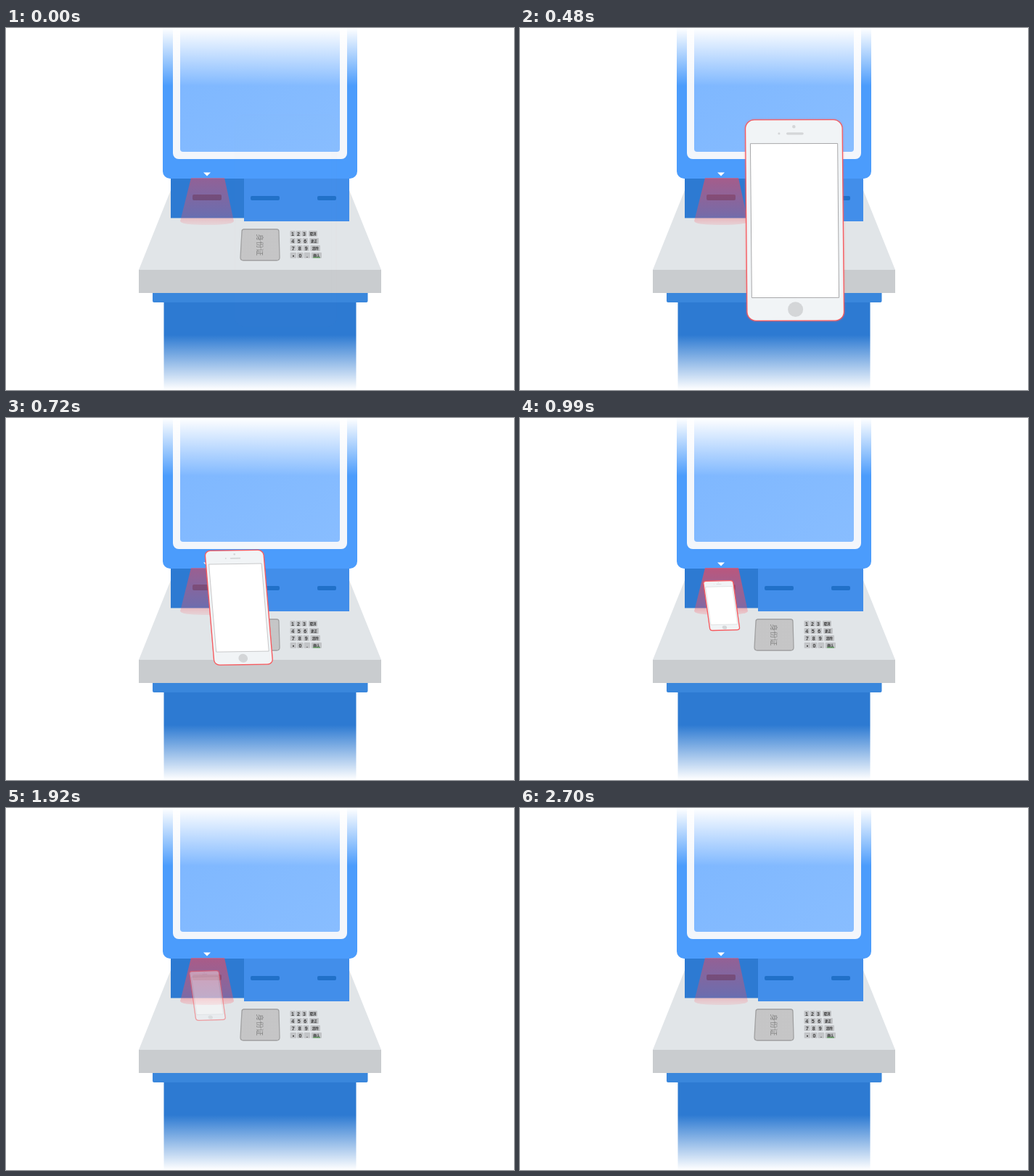
These frames come from a looping animation (700x500 px, 2730 ms). An HTML page:

```html
<!DOCTYPE html>
<html lang="zh">
<head>
<meta charset="utf-8">
<style>
  html, body { margin: 0; width: 100%; height: 100%; overflow: hidden; background: #fff; }
  svg { display: block; width: 700px; height: 500px; }
  text { text-anchor: middle; font-family: "Noto Sans CJK SC", "Noto Sans CJK", "Noto Sans", sans-serif; }
  .digit { font: bold 7px "Liberation Sans", sans-serif; fill: #3a3a3a; }
  .label { font-size: 4.5px; font-weight: bold; fill: #333; }
</style>
</head>
<body>
<svg viewBox="0 0 700 500">
  <defs>
    <linearGradient id="topFade" x2="0" y2="1">
      <stop stop-color="#fff"/><stop offset="1" stop-color="#fff" stop-opacity="0"/>
    </linearGradient>
    <linearGradient id="bottomFade" x2="0" y2="1">
      <stop stop-color="#fff" stop-opacity="0"/><stop offset="1" stop-color="#fff"/>
    </linearGradient>
    <linearGradient id="display" x2="1" y2="1">
      <stop stop-color="#7cb6ff"/><stop offset="1" stop-color="#88bdff"/>
    </linearGradient>
    <linearGradient id="ray" x2="0" y2="1">
      <stop stop-color="#ff4654"/><stop offset=".8" stop-color="#ff4e5a" stop-opacity=".62"/>
      <stop offset="1" stop-color="#ff5a66" stop-opacity=".25"/>
    </linearGradient>
    <pattern id="hatch" width="2" height="2" patternUnits="userSpaceOnUse">
      <rect width="2" height="2" fill="#c9c9ca"/><rect width="1" height="1" fill="#bababb"/>
    </pattern>
    <filter id="soft" x="-20%" y="-20%" width="140%" height="140%"><feGaussianBlur stdDeviation="1.2"/></filter>
    <path id="beam" d="M255 207H301L314 267Q312 272 277 272T240 267Z" fill="url(#ray)"/>
  </defs>

  <path d="M227 224H473L517 334H183Z" fill="#e1e5e8"/>
  <path d="M183 334H517V366H183Z" fill="#c9cccf"/>
  <path d="M217.5 379H482.5V500H217.5Z" fill="#2d7ad2"/>
  <path d="M202 366H498.5V377Q498.5 379 496.5 379H204Q202 379 202 377Z" fill="#3a87dc"/>
  <rect x="210" y="424" width="280" height="76" fill="url(#bottomFade)"/>

  <path d="M227 206H328V262.5H227Z" fill="#2d7ad2"/>
  <path d="M328 206H473V267H328Z" fill="#428eea"/>
  <g fill="#2070c8">
    <rect x="257" y="230" width="40" height="8" rx="2" fill="#1c4f92"/>
    <rect x="337" y="232" width="40" height="6" rx="2"/>
    <rect x="429" y="232" width="26" height="6" rx="2"/>
  </g>

  <rect x="216" y="-20" width="268" height="228" rx="10" fill="#4b9cfc"/>
  <rect x="230" y="-20" width="240" height="201" rx="8" fill="#f3f6fb"/>
  <rect x="240" y="-20" width="220" height="191" rx="4" fill="url(#display)"/>
  <rect x="210" width="280" height="80" fill="url(#topFade)"/>
  <path d="M272 199.5H282L277 204.5Z" fill="#fff"/>

  <path d="M328 278H373Q376 278 376 281L377 317Q377 321 373 321H327Q323 321 323 317L325 281Q325 278 328 278Z"
        fill="url(#hatch)" stroke="#a0a0a1" stroke-width="1.3"/>
  <text transform="translate(346 299.5) rotate(90)" font-size="10" fill="#858585">身份证</text>
  <g id="keypad"></g>

  <use id="glow" href="#beam"/>
  <g id="phone">
    <rect x="-70" y="-146" width="140" height="292" rx="13" fill="none" stroke="#ff5a5a" stroke-width="2" opacity=".4" filter="url(#soft)"/>
    <rect x="-70" y="-146" width="140" height="292" rx="13" fill="#f1f4f6" stroke="#f65a5f" stroke-width="1.3" vector-effect="non-scaling-stroke"/>
    <rect x="-63" y="-111.5" width="126" height="224" fill="#fff" stroke="#a4a4a6"/>
    <g fill="#d4d6d8">
      <circle cy="129.5" r="11"/>
      <circle cy="-136" r="2.4"/>
      <circle cx="-21.5" cy="-126" r="1.6"/>
      <rect x="-11" y="-127.7" width="25" height="3.4" rx="1.7"/>
    </g>
  </g>
  <use id="scan" href="#beam"/>
</svg>
<script>
const LOOP = 2730;
const $ = id => document.getElementById(id);
const clamp = v => Math.min(1, Math.max(0, v));
const ramp = (t, from, to) => clamp((t - from) / (to - from));
const easeInOut = x => x < .5 ? 2 * x * x : 1 - 2 * (1 - x) ** 2;

function key(x, y, w, label, cls) {
  return `<rect x="${x - w / 2}" y="${y - 4}" width="${w}" height="8" rx="1" fill="#c2c4c7"/>
    <text class="${cls}" x="${x}" y="${y + (cls === 'digit' ? 2.5 : 1.6)}">${label}</text>`;
}

const labels = ['取消', '更正', '清除', '确认'];
$('keypad').innerHTML = ['123', '456', '789', '•0.'].map((digits, row) => {
  const y = 284 + row * 10, step = 8 + row * .5;
  return [...digits].map((d, i) => key(395 + row * .3 + i * step, y, step - 1, d, 'digit')).join('') +
    key(423 + row * 1.6, y, 12 + row * .8, labels[row], 'label');
}).join('') + '<path d="M423 317H433" stroke="#4aa04a"/>';

function draw(t) {
  const p = easeInOut(ramp(t, 365, 1010));
  const sx = 1 - .709 * p, sy = 1 - .768 * p;
  const matrix = [sx, -.025 * p * sx, .14 * p * sy, sy, 385.5 - 108 * p, 266 - 7 * p];
  $('phone').setAttribute('transform', `matrix(${matrix})`);
  $('phone').setAttribute('opacity', ramp(t, 0, 250) * (1 - ramp(t, 1700, 2160)));

  const pulse = (1 - Math.cos(t / LOOP * 14 * Math.PI)) / 2;
  $('glow').setAttribute('opacity', .48 + .2 * pulse);
  $('scan').setAttribute('opacity', .4 * ramp(t, 1080, 1380) * (1 - ramp(t, 1650, 2200)));
}

function tick(now) {
  draw(now % LOOP);
  requestAnimationFrame(tick);
}
draw(0);
requestAnimationFrame(tick);
</script>
</body>
</html>
```
